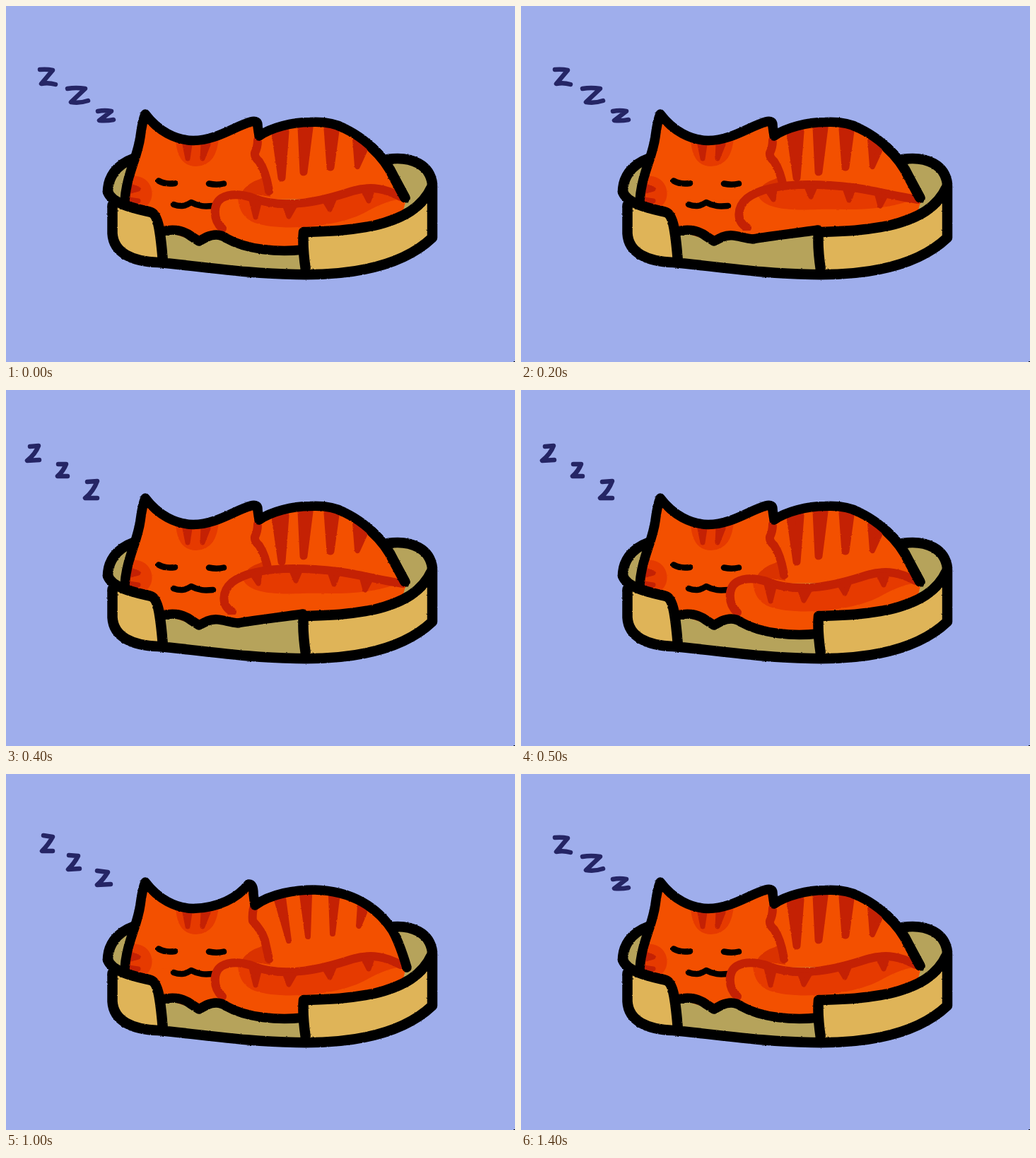
An HTML page for the animation above (1500 ms loop, 720x504 px).

```html
<!DOCTYPE html>
<html lang="en">
<head>
<meta charset="utf-8">
<title>Sleeping cat</title>
<style>
  html, body { margin: 0; width: 100%; height: 100%; overflow: hidden; background: #9faeec; }
  svg { display: block; width: 100vw; height: 100vh; }
  path { stroke-linecap: round; stroke-linejoin: round; }
  .fur { fill: #f35000; }
  .shade { fill: #e63a00; }
  .cheek { fill: #da3200; }
  .stripe { fill: #c42104; stroke: #c42104; stroke-width: 11; }
  .thin { stroke-width: 8; }
  .tooth { fill: #c42104; stroke: #c42104; stroke-width: 7; }
  .edge { fill: none; stroke: #c42104; stroke-width: 12; }
  .line { fill: none; stroke: #000; stroke-width: 14.5; }
  .cat { stroke-width: 13.5; }
  .face { fill: none; stroke: #000; stroke-width: 8.5; }
  .inside { fill: #b6a35b; }
  .panel { fill: #dfb458; }
  .belly { fill: #f35000; stroke: #000; stroke-width: 13.5; }
  .zzz { fill: none; stroke: #252565; stroke-width: 6.5; }
</style>
</head>
<body>
<svg viewBox="0 0 720 504">
  <defs>
    <filter id="rough" filterUnits="userSpaceOnUse" x="0" y="0" width="720" height="504" color-interpolation-filters="sRGB">
      <feTurbulence type="fractalNoise" baseFrequency=".3" numOctaves="2" seed="4"/>
      <feDisplacementMap in="SourceGraphic" scale="2" xChannelSelector="R" yChannelSelector="G"/>
    </filter>
    <path id="cat0" d="M168 276C170 240 186 215 190 185Q193 162 197 153C215 177 240 190 265 190.500C298 190 322 171 346 164Q357 161 356 170L358 184C375 172 405 164.500 430 164.500Q460 163 478 173C510 188 533 213 545 235L565 272"/>
    <path id="cat1" d="M168 276C170 240 186 215 190 185Q193 162 197 153C215 177 240 190 265 190.500C300 190 328 175 343 156Q350 155 350 170L352 186C375 169 410 164 436 164C490 165 527 190 547 222Q557 240 567 274"/>
  </defs>

  <g filter="url(#rough)">
    <path class="inside" d="M142 263C142 238 158 222 185 213L540 217C575 212 600 226 603 256L560 350 424 380C340 379 280 369 215 363L150 300Z"/>
    <path class="line" d="M180 216C155 225 144 244 144 263M540 217C575 212 600 226 603 252"/>

    <path class="fur" d="M168 274H566L558 304 420 322 290 325 273 334 222 318 168 290Z"/>
    <g data-cat="0">
      <use href="#cat0" class="fur"/>
      <path class="stripe" d="M381 180L395 178 390 243ZM418 172H429L421 235ZM455 174L466 177 459 228Z"/>
      <path class="stripe thin" d="M494 188L507 205 497 227Z"/>
    </g>
    <g data-cat="1">
      <use href="#cat1" class="fur"/>
      <path class="stripe thin" d="M383 178L392 175 400 236ZM419 171H429L427 230ZM460 173L468 176 462 226ZM501 186L507 196 499 215Z"/>
    </g>

    <path class="cheek" d="M333 264Q344 247 370 242L374 270Z"/>
    <path class="shade" d="M240 186Q241 227 269 227Q299 226 301 184ZM176 241C214 237 214 285 190 286L170 280Z"/>
    <path class="tooth" d="M253 196H260L257 216ZM279 196H286L278 216ZM176 255L187 259 176 262ZM174 274L187 276 176 279Z"/>
    <path class="edge" data-cat="0" d="M356 190Q356 200 352 208Q351 214 358 220Q368 235 372 262"/>
    <path class="edge" data-cat="1" d="M350 190Q348 200 349 208Q362 222 366 235L372 262"/>
    <path class="face" d="M216 247.500Q225 253 239 251M287 251.500Q298 254 308 251.500M237 281C248 285 254 283 262 278C273 284 281 284 293 283"/>

    <g data-tail="0">
      <path class="fur" d="M308 318C292 305 293 280 305 272C318 265 335 267 350 272C395 290 450 275 490 262C520 253 545 260 564 272L560 300 420 345C380 350 340 345 312 330Z"/>
      <path class="shade" d="M328 272Q330 299 352 307C390 320 475 313 512 290Q535 277 558 273C530 258 505 260 490 262C450 275 395 290 350 272Z"/>
      <path class="edge" d="M306 315C292 302 293 280 305 272C318 265 335 267 350 272C395 290 450 275 490 262C517 254 538 259 558 270"/>
      <path class="tooth" d="M347 275L358 279 353 299ZM395 284L408 284 400 298ZM452 278L464 274 458 288ZM506 262L518 262 513 276Z"/>
    </g>
    <g data-tail="1">
      <path class="fur" d="M320 314C305 306 304 286 320 272C350 250 410 250 470 257C510 263 540 270 564 275L556 302 420 318Z"/>
      <path class="shade" d="M334 266C342 286 370 290 420 288C460 287 500 292 550 276C530 268 510 263 470 257C420 250 360 250 334 266Z"/>
      <path class="edge" d="M320 314C305 306 304 286 320 272C350 250 410 250 470 257C510 263 535 271 562 274"/>
      <path class="tooth" d="M349 262L359 260 357 274ZM404 256H416L410 270ZM458 258L470 260 464 275ZM504 268L515 270 508 283Z"/>
    </g>
    <g data-tail="2">
      <path class="fur" d="M564 274C540 262 500 235 450 222C400 213 350 220 330 245C315 265 320 290 345 296C375 296 400 280 440 281C475 282 505 293 520 300L556 300Z"/>
      <path class="shade" d="M348 232C360 252 390 259 430 254C470 250 505 270 545 276L560 272C535 258 500 235 450 222C410 215 370 216 348 232Z"/>
      <path class="edge" d="M560 272C535 258 500 235 450 222C400 213 350 220 330 245C315 265 320 292 345 296C375 296 400 280 440 281C475 282 500 290 518 300"/>
      <path class="tooth" d="M373 223L391 222 379 240ZM428 224L444 226 433 241ZM483 238L498 243 483 252ZM524 257L544 266 520 268Z"/>
    </g>

    <use href="#cat0" class="line cat" data-cat="0"/>
    <use href="#cat1" class="line cat" data-cat="1"/>
    <path class="line" data-cat="0" d="M517 200Q538 219 549 243L564 271"/>

    <path class="panel" d="M144 263C150 281 185 287 205 292C216 295 219 325 222 363C180 362 152 350 150 322Z"/>
    <path class="panel" d="M603 258C590 285 562 301 520 311C480 319 450 319 421 320L424 380C500 382 565 364 603 328Z"/>
    <path class="belly" data-tail="0" d="M222 319C240 314 254 320 262 326L273 333 284 327Q300 320 312 329C340 345 385 349 420 345"/>
    <path class="belly" data-tail="1" d="M222 319C240 314 254 320 262 326L273 333 285 327C300 321 312 329 328 330C355 325 395 321 420 317"/>
    <path class="belly" data-tail="2" d="M222 319C240 314 254 320 262 326L273 333 286 327Q308 319 326 333Q348 319 374 331Q395 322 420 320"/>
    <path class="line" d="M144 263C150 281 185 287 205 292C216 295 219 325 222 362M150.500 282V322C152 350 180 362 215 363C280 369 340 379 410 380C500 382 565 364 603 328V254C590 285 562 301 520 311C480 319 450 319 421 320Q419 340 424 374"/>
  </g>

  <path class="zzz" data-zzz="0" d="M48 90Q58 89 66 91L50 110Q60 108 70 111M87 117Q99 115 112 117L92 136Q104 138 116 134M130 149Q140 147 149 149L132 162Q142 163 152 161"/>
  <path class="zzz" data-zzz="1" d="M34 80L46 79Q42 90 30 100L47 99M74 105L85 105Q81 115 73 122L87 122M115 130L129 129Q124 143 112 153L129 153"/>
  <path class="zzz" data-zzz="2" d="M53 87L66 89Q60 100 51 109L66 109M89 115L102 116Q97 126 88 135L104 134M129 137L144 139Q138 149 129 157L148 156"/>
  <path d="M718 503h2v1h-2z"/>
</svg>
<script>
  const STEP = 100, STEPS = 15;
  const TAIL = { 2: 1, 3: 2, 4: 1 };

  function show(part, pose) {
    for (const el of document.querySelectorAll(`[data-${part}]`))
      el.style.display = el.dataset[part] == pose ? '' : 'none';
  }

  let last = -1;
  function draw() {
    const step = Math.floor(performance.now() / STEP) % STEPS;
    if (step !== last) {
      last = step;
      const zzz = Math.floor((step + 1) % STEPS / 5);
      show('tail', TAIL[step] || 0);
      show('zzz', zzz);
      show('cat', zzz === 2 ? 1 : 0);
    }
    requestAnimationFrame(draw);
  }
  draw();
</script>
</body>
</html>
```
